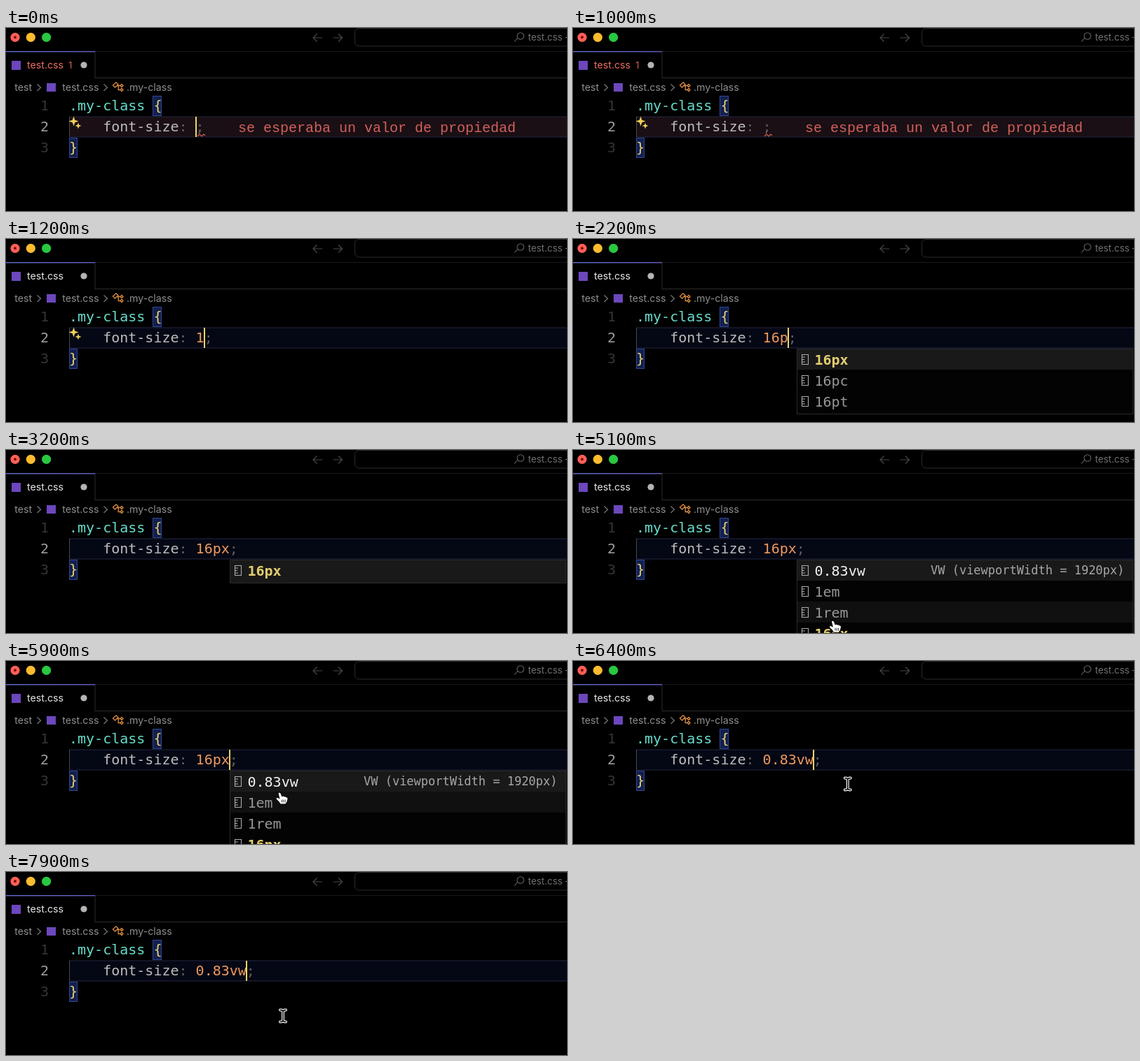
Recreate the animation shown at these times as an HTML page with a canvas. Size 800 by 262 pixels, loop 8000 ms.

```html
<!DOCTYPE html>
<html lang="es">
<head>
<meta charset="utf-8">
<title>test.css</title>
<style>
html, body { margin: 0; width: 100%; height: 100%; overflow: hidden; background: #000; }
canvas { display: block; width: 800px; height: 262px; }
</style>
</head>
<body>
<canvas id="stage" width="800" height="262"></canvas>
<script>
const ctx = document.getElementById('stage').getContext('2d');
const LOOP = 8000, STEP = 100, BLINK = 1650;
const MONO = '"DejaVu Sans Mono", monospace';
const CODE = '20px ' + MONO;
const UI = '14.2px Inter, sans-serif';
const CHAR = 12.04, LEFT = 90;
const YELLOW = '#ecd36c', ORANGE = '#ee995c';

// Each edit restarts the caret blink.
const edits = [
  [-150, ''], [1100, '1'], [2000, '16'], [2200, '16p'], [2400, '16px'], [6300, '0.83vw']
];
const popups = [
  [0, null],
  [2000, ['16px', '16rem', '16em', '16vw']],
  [2200, ['16px', '16pc', '16pt']],
  [2400, ['16px']],
  [4000, null],
  [4600, ['0.83vw', '1em', '1rem', '16px']],
  [6300, null]
];
const pointerPath = [
  [4900, 366, 264], [5200, 374, 238], [5400, 374, 238], [5900, 391.5, 188.5],
  [6200, 391, 176], [6500, 392, 176], [7100, 395, 206]
];

const latest = (list, t) => list.filter(item => item[0] <= t).pop();
const clamp = v => Math.max(0, Math.min(1, v));
const smooth = v => { v = clamp(v); return v * v * (3 - 2 * v); };

function text(str, x, y, color, font = CODE, align = 'left') {
  ctx.font = font;
  ctx.fillStyle = color;
  ctx.textAlign = align;
  ctx.fillText(str, x, y);
}

function rect(x, y, w, h, color) {
  ctx.fillStyle = color;
  ctx.fillRect(x, y, w, h);
}

function frame(x, y, w, h, fill, stroke) {
  rect(x, y, w, h, fill);
  ctx.strokeStyle = stroke;
  ctx.lineWidth = 1;
  ctx.strokeRect(x + .5, y + .5, w - 1, h - 1);
}

function disc(x, y, r, color) {
  ctx.fillStyle = color;
  ctx.beginPath();
  ctx.arc(x, y, r, 0, Math.PI * 2);
  ctx.fill();
}

function path(d, color, width = 1.2) {
  ctx.strokeStyle = color;
  ctx.lineWidth = width;
  ctx.stroke(new Path2D(d));
}

function star(x, y, r) {
  ctx.fillStyle = '#efcf58';
  ctx.beginPath();
  for (let i = 0; i < 8; i++) {
    const d = i % 2 ? r * .36 : r, a = i * Math.PI / 4;
    ctx.lineTo(x + d * Math.cos(a), y + d * Math.sin(a));
  }
  ctx.fill();
}

function drawWindow(hasError) {
  disc(13, 13.3, 6.6, '#ff5f57');
  disc(13, 13.3, 2, '#7a0c08');
  disc(35.3, 13.3, 6.6, '#febc2e');
  disc(57.6, 13.3, 6.6, '#28c840');

  path('M451 14H438M443.5 8.5L438 14L443.5 19.5', '#484848');
  path('M466.5 14H479.5M474 8.5L479.5 14L474 19.5', '#484848');
  ctx.strokeStyle = '#2b2b2b';
  ctx.lineWidth = 1;
  ctx.beginPath();
  ctx.roundRect(497.5, .5, 330, 25.5, 6);
  ctx.stroke();
  path('M729.5 14.5L725 19.5M738.5 11.5A4.8 4.8 0 1 1 728.9 11.5A4.8 4.8 0 1 1 738.5 11.5', '#656565', 1.1);
  text('test.css —', 744.5, 18, '#707070', '13.4px Inter, sans-serif');

  rect(127, 33, 673, 1, '#191919');
  rect(127, 71, 673, 1, '#2b2b2b');
  rect(126.5, 33, 1, 39, '#2b2b2b');
  const accent = ctx.createLinearGradient(0, 0, 127, 0);
  accent.addColorStop(0, '#5b68c4');
  accent.addColorStop(1, '#6259b8');
  rect(0, 33, 127, 1.5, accent);
  rect(8, 47, 13, 13, '#6c47bd');
  text('test.css', 30, 58, hasError ? '#ee6c63' : '#e6e6e6', UI);
  if (hasError) text('1', 89, 58, '#cf5d56', '13.5px Inter, sans-serif');
  disc(111, 53, 4.6, '#b4b4b4');

  text('test', 12.3, 90, '#8e8e8e', UI);
  text('test.css', 80.3, 90, '#8e8e8e', UI);
  text('.my-class', 172, 90, '#8e8e8e', UI);
  rect(58, 79, 13, 12, '#6c47bd');
  path('M44.5 80.5L49.5 85.2L44.5 90M139.5 80.5L144.5 85.2L139.5 90', '#777');
  path('M152.5 82L157 77.8L160 80.8L155.5 85ZM158.5 82.5H163M160.2 82.5V88.5H163M163 82.5L165 80.5L167 82.5L165 84.5ZM163 88.5L165 86.5L167 88.5L165 90.5Z', '#e08d3c', 1.3);
}

function drawCode(t, value, hasError) {
  rect(90, 127, 710, 29, hasError ? '#190f14' : '#040714');
  rect(90, 126.5, 710, 1, '#242842');
  rect(90, 155.5, 710, 1, '#242842');
  rect(90, 127, 1, 29, '#4a4a4a');
  frame(209, 97, 13, 29, '#122050', '#31468f');
  frame(90, 157, 12, 29, '#122050', '#31468f');

  ['1', '2', '3'].forEach((n, i) =>
    text(n, 61, 118 + 30 * i, i === 1 ? '#9c9c9c' : '#343434', CODE, 'right'));
  text('.my-class', LEFT, 118, '#66dccb');
  text('{', LEFT + 10 * CHAR, 118, YELLOW);
  text('}', LEFT, 178, YELLOW);
  text('font-size', LEFT + 4 * CHAR, 148, '#bcbcbc');
  text(':', LEFT + 13 * CHAR, 148, '#606060');
  const start = LEFT + 15 * CHAR, end = start + value.length * CHAR;
  text(value, start, 148, ORANGE);
  text(';', end, 148, '#606060');

  if (hasError) {
    path('M273 155L276 152L279 155L282 152L284 154', '#d5605a', 1.2);
    text('se esperaba un valor de propiedad', 331, 149, '#d4605b', '20px "Liberation Mono", monospace');
  }
  if (t < 2000) {
    star(96.5, 133.5, 7);
    star(103, 140, 4.5);
  }
}

function drawCaret(t, edit) {
  const phase = (t - edit[0]) / BLINK % 1;
  const fromVisible = Math.min(phase, 1 - phase);
  ctx.globalAlpha = 1 - smooth((fromVisible - .1) / .2);
  rect(Math.round(LEFT + (15 + edit[1].length) * CHAR - 1), 127, 2, 29, '#f0d565');
  ctx.globalAlpha = 1;
}

function drawPopup(items, pointer) {
  const height = items.length * 30 + 4;
  frame(319, 157, 480, height, '#030303', '#2a2a2a');
  const hover = pointer ? Math.floor((pointer.y - 157) / 30) : -1;
  items.forEach((label, i) => {
    const y = 157 + 30 * i, exact = label === '16px';
    if (i === 0) rect(320, y + 1, 478, items.length === 1 ? 32 : 29, '#191919');
    else if (i === hover) rect(320, y, 478, 30, '#101010');
    path(`M326.5 ${y + 8.5}h9v14h-9zM327 ${y + 12}h4M327 ${y + 15.5}h3M327 ${y + 19}h4`, '#aaa', 1.1);
    text(label, 344.5, y + 22.5, exact ? '#e2cd6f' : i ? '#979797' : '#f2f2f2', exact ? 'bold ' + CODE : CODE);
  });
  if (items[0] === '0.83vw') {
    text('VW (viewportWidth = 1920px)', 786.3, 178, '#a6a6a6', '17px ' + MONO, 'right');
  }
}

function pointerAt(t) {
  const i = pointerPath.findLastIndex(p => p[0] <= t);
  if (i < 0) return null;
  const a = pointerPath[i], b = pointerPath[i + 1] || a;
  const k = b === a ? 0 : smooth((t - a[0]) / (b[0] - a[0]));
  return { x: a[1] + (b[1] - a[1]) * k, y: a[2] + (b[2] - a[2]) * k };
}

function drawPointer(p, isHand) {
  ctx.save();
  ctx.translate(p.x, p.y);
  if (isHand) {
    const hand = new Path2D('M-3 1Q-2-1 0 1L2 6Q4 4 5 6Q7 5 8 7Q10 6 10 9L9 13L7 16H0L-2 13L-6 9Q-6 6-3 8L-1 9Z');
    ctx.strokeStyle = '#000';
    ctx.lineWidth = 2;
    ctx.stroke(hand);
    ctx.fillStyle = '#fff';
    ctx.fill(hand);
    path('M2 10V14M4.3 10V14M6.6 10V14', '#000', .8);
  } else {
    const beam = 'M-4-8.5Q0-8.5 0-6V6Q0 8.5-4 8.5M4-8.5Q0-8.5 0-6M0 6Q0 8.5 4 8.5';
    ctx.lineCap = 'round';
    path(beam, '#f2f2f2', 4);
    path(beam, '#000', 1.5);
  }
  ctx.restore();
}

function draw(t) {
  const edit = latest(edits, t), items = latest(popups, t)[1];
  const hasError = edit[1] === '', pointer = pointerAt(t);
  rect(0, 0, 800, 262, '#000');
  drawWindow(hasError);
  drawCode(t, edit[1], hasError);
  drawCaret(t, edit);
  if (items) drawPopup(items, pointer);
  if (pointer) drawPointer(pointer, Boolean(items));
}

const began = performance.now();
function tick() {
  const t = (performance.now() - began) % LOOP;
  draw(Math.floor(t / STEP) * STEP);
  requestAnimationFrame(tick);
}
tick();
</script>
</body>
</html>
```
